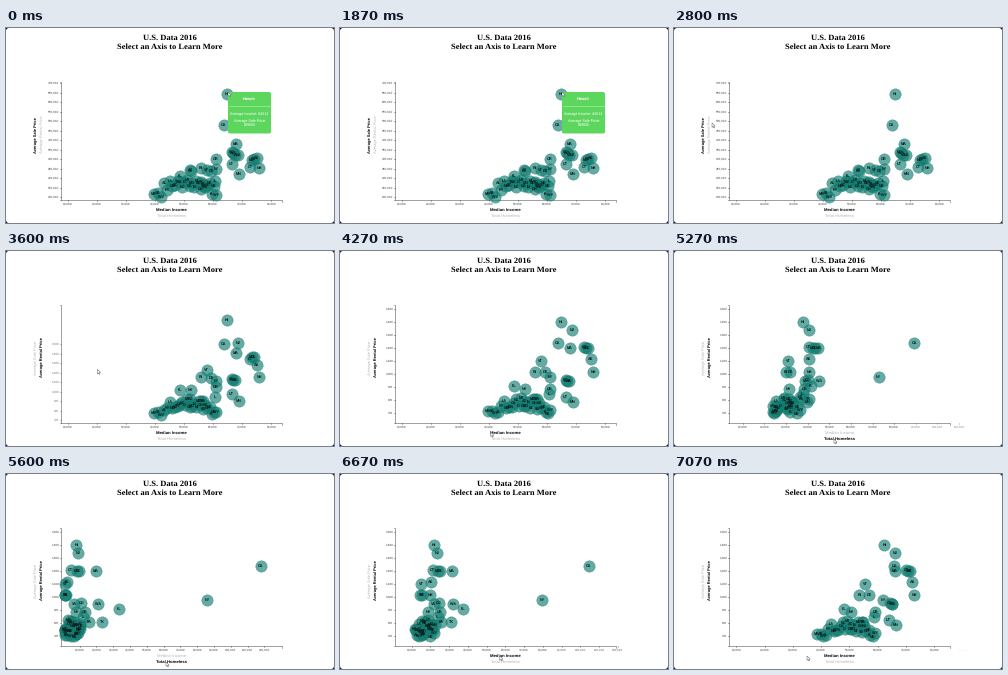
A matplotlib script for the animation above (7.14 s loop, 328 px wide and 195 px high).

```python
import numpy as np
import matplotlib.pyplot as plt
from matplotlib.animation import FuncAnimation
from matplotlib.patches import FancyBboxPatch, Polygon

W, H = 328, 195
DPI = 64
PT = 72 / DPI  # points per pixel
FRAMES, INTERVAL = 210, 34
STEP = FRAMES * INTERVAL / 107  # the motion advances at 15 poses a second
Y_CLICK, X_CLICK, X_BACK = 3012, 4734, 6328
TIP_END = 1900
SANS, SERIF = "Liberation Sans", "Liberation Serif"

plt.rcParams["text.hinting"] = "none"

# Pixel positions: income x, homeless x, sale price y, rental price y
STATES = {
    "HI": (220.5, 69, 65.5, 70.5), "CA": (218, 255, 97, 92),
    "NJ": (232, 71, 127, 78.5), "MA": (230, 88.5, 115.5, 97),
    "DC": (247.5, 71, 131, 97), "MD": (246, 69, 132, 96.5),
    "CT": (244, 63, 139, 96), "AK": (251, 59, 129.5, 107.5),
    "NH": (253, 58, 140, 121), "WA": (226.5, 91, 125, 130),
    "CO": (226, 74, 124, 129), "VA": (229, 67, 127, 129.5),
    "OR": (210, 78, 131, 137.5), "UT": (225.5, 61, 136, 145.5),
    "MN": (233, 68, 146, 151), "NY": (210, 201, 141, 125.5),
    "VT": (200.5, 58, 142, 110), "DE": (205, 58, 143, 120.5),
    "NV": (184.5, 69, 143, 138), "FL": (174, 112.5, 148, 135),
    "TX": (195, 95, 154, 148), "PA": (197, 82, 156, 147.5),
    "IL": (209, 76, 153, 143), "RI": (194.5, 58, 140, 120.5),
    "AZ": (184, 73, 142, 150),
}
CLUSTER = ("MS AR WV AL KY LA NM SC TN OK NC ID MT GA MO IN "
           "MI ME OH SD KS WI NE IA ND WY").split()


def cluster_points():
    rng = np.random.default_rng(5)
    n = len(CLUSTER)
    u = np.linspace(0, 1, n)
    income = 148 + 62 * u ** 0.85
    homeless = 57.5 + 16 * rng.random(n) ** 1.3
    sale = 164 - 8 * np.sin(np.pi * u) + rng.uniform(-6, 5, n)
    rent = 156 - 3 * np.sin(np.pi * u) + rng.uniform(-8, 7, n)
    sale[:3] = 166, 165, 169
    rent[:3] = 160, 160, 162
    return np.column_stack([income, homeless, sale, rent])


def income_x(v):
    return 32.4 + 29.1 * v / 10000


def homeless_x(v):
    return 57 + 16.7 * v / 10000


def sale_y(v):
    return 55 + (700000 - v) * 1.9e-4


def rent_y(v):
    return 57.5 + (1500 - v) * 0.131


def ease(t, start, duration=1000):
    u = min(max((t - start) / duration, 0), 1)
    return 4 * u ** 3 if u < 0.5 else 1 - 4 * (1 - u) ** 3


def mix(a, b, p):
    return a + (b - a) * p


fig = plt.figure(figsize=(W / DPI, H / DPI), dpi=DPI, facecolor="#10141c")
ax = fig.add_axes([0, 0, 1, 1])
ax.set(xlim=(0, W), ylim=(H, 0))
ax.axis("off")


def text(x, y, s, size, color="black", **kw):
    kw = {"ha": "center", "va": "center", "family": SANS, **kw}
    return ax.text(x, y, s, fontsize=size * PT, color=color, **kw)


def line(xs, ys, color="#444444", width=0.5, **kw):
    return ax.plot(xs, ys, color=color, lw=width * PT, **kw)[0]


def rounded(x, y, w, h, r, color, **kw):
    box = FancyBboxPatch((x, y), w, h, fc=color, ec="none",
                         boxstyle=f"round,pad=0,rounding_size={r}", **kw)
    return ax.add_patch(box)


class Tick:
    """Axis tick that slides and fades between two scales."""

    def __init__(self, value, vertical, ends, shown):
        self.vertical, self.ends, self.shown = vertical, ends, shown
        self.mark = line([], [], zorder=1)
        self.label = text(0, 0, f"{value:,}", 3.1, "#444444", zorder=1,
                          ha="right" if vertical else "center")

    def update(self, p):
        pos, alpha = mix(*self.ends, p), mix(*self.shown, p)
        limit = 173 if self.vertical else 290
        visible = alpha > 0.01 and 50 < pos < limit
        for artist in (self.mark, self.label):
            artist.set_visible(visible)
            artist.set_alpha(alpha)
        if self.vertical:
            self.mark.set_data([53.6, 55], [pos, pos])
            self.label.set_position((53.2, pos))
        else:
            self.mark.set_data([pos, pos], [172, 173.4])
            self.label.set_position((pos, 176.3))


def set_active(label, active):
    label.set_color("black" if active else "#b8b8b8")
    label.set_fontweight("bold" if active else "normal")


rounded(0, 0, W, H, 3, "white", zorder=0)
for baseline, title in ((12, "U.S. Data 2016"), (21, "Select an Axis to Learn More")):
    text(164, baseline, title, 8.45, family=SERIF, weight="bold", va="baseline")

line([53.5, 55, 55, 53.5], [53.5, 53.5, 172, 172])
line([55, 276, 276], [172, 172, 173.5])
x_ticks = [Tick(v, False, (income_x(v), homeless_x(v)), (v <= 80000, 1))
           for v in range(10000, 120001, 10000)]
y_ticks = [Tick(v, True, (sale_y(v), rent_y(v)), (1, 0))
           for v in range(100000, 700001, 50000)]
y_ticks += [Tick(v, True, (sale_y(v), rent_y(v)), (0, 1))
            for v in range(700, 1501, 100)]

sale_label = text(30.5, 107, "Average Sale Price", 4, rotation=90)
rent_label = text(36.5, 106, "Average Rental Price", 4, rotation=90)
income_label = text(165.5, 182, "Median Income", 4.2)
homeless_label = text(165.5, 187.8, "Total Homeless", 4.2)

points = np.vstack([list(STATES.values()), cluster_points()])
names = list(STATES) + CLUSTER
dots = ax.scatter(points[:, 0], points[:, 2], s=(11.4 * PT) ** 2, zorder=3,
                  facecolors=(0.07, 0.5, 0.45, 0.66),
                  edgecolors=(0.07, 0.42, 0.38, 0.55), linewidths=0.5 * PT)
tags = [text(0, 0, name, 3.7, "#061a1a", weight="bold", zorder=4)
        for name in names]

tooltip = [
    rounded(222, 64, 43, 41.5, 2, "#5cd65c", zorder=5),
    line([222.5, 264.5], [78.3, 78.3], "#c9f2c9", 0.5, zorder=6),
    text(243.5, 71.3, "Hawaii", 4, "white", weight="bold", zorder=6),
    text(243.5, 86.3, "Average Income: 64514", 3.6, "white", zorder=6),
    text(243.5, 92.7, "Average Sale Price:", 3.6, "white", zorder=6),
    text(243.5, 97, "639000", 3.6, "white", zorder=6),
]

ARROW = np.array([(0, 0), (0, 4.4), (1, 3.5), (1.8, 5), (2.5, 4.7),
                  (1.8, 3.2), (3.1, 3.1)])
cursor = ax.add_patch(Polygon(ARROW, fc="white", ec="#666666",
                              lw=0.5 * PT, zorder=8))
# time, x, y
PATH = np.array([(0, 222, 64), (1870, 222, 64), (2530, 50, 99),
                 (2800, 38, 95), (3050, 38, 95), (3600, 91, 118),
                 (4070, 145, 177), (4600, 160, 188), (5600, 160, 188),
                 (6270, 161, 182), (6670, 160, 182), (7070, 133, 182)])


def draw(frame):
    t = min(round(frame * INTERVAL / STEP + 0.05), 106) * STEP
    p = ease(t, X_CLICK) - ease(t, X_BACK)
    q = ease(t, Y_CLICK)
    for tick in x_ticks:
        tick.update(p)
    for tick in y_ticks:
        tick.update(q)

    xy = np.column_stack([mix(points[:, 0], points[:, 1], p),
                          mix(points[:, 2], points[:, 3], q)])
    dots.set_offsets(xy)
    for tag, pos in zip(tags, xy):
        tag.set_position(pos)

    rent_on, homeless_on = t >= Y_CLICK, X_CLICK <= t < X_BACK
    set_active(sale_label, not rent_on)
    set_active(rent_label, rent_on)
    set_active(income_label, not homeless_on)
    set_active(homeless_label, homeless_on)

    for part in tooltip:
        part.set_visible(t < TIP_END)
    tip = [np.interp(t, PATH[:, 0], PATH[:, k]) for k in (1, 2)]
    cursor.set_xy(ARROW + tip)
    return []


anim = FuncAnimation(fig, draw, frames=FRAMES, interval=INTERVAL,
                     init_func=lambda: [], repeat=True, repeat_delay=0)
plt.show()
```
